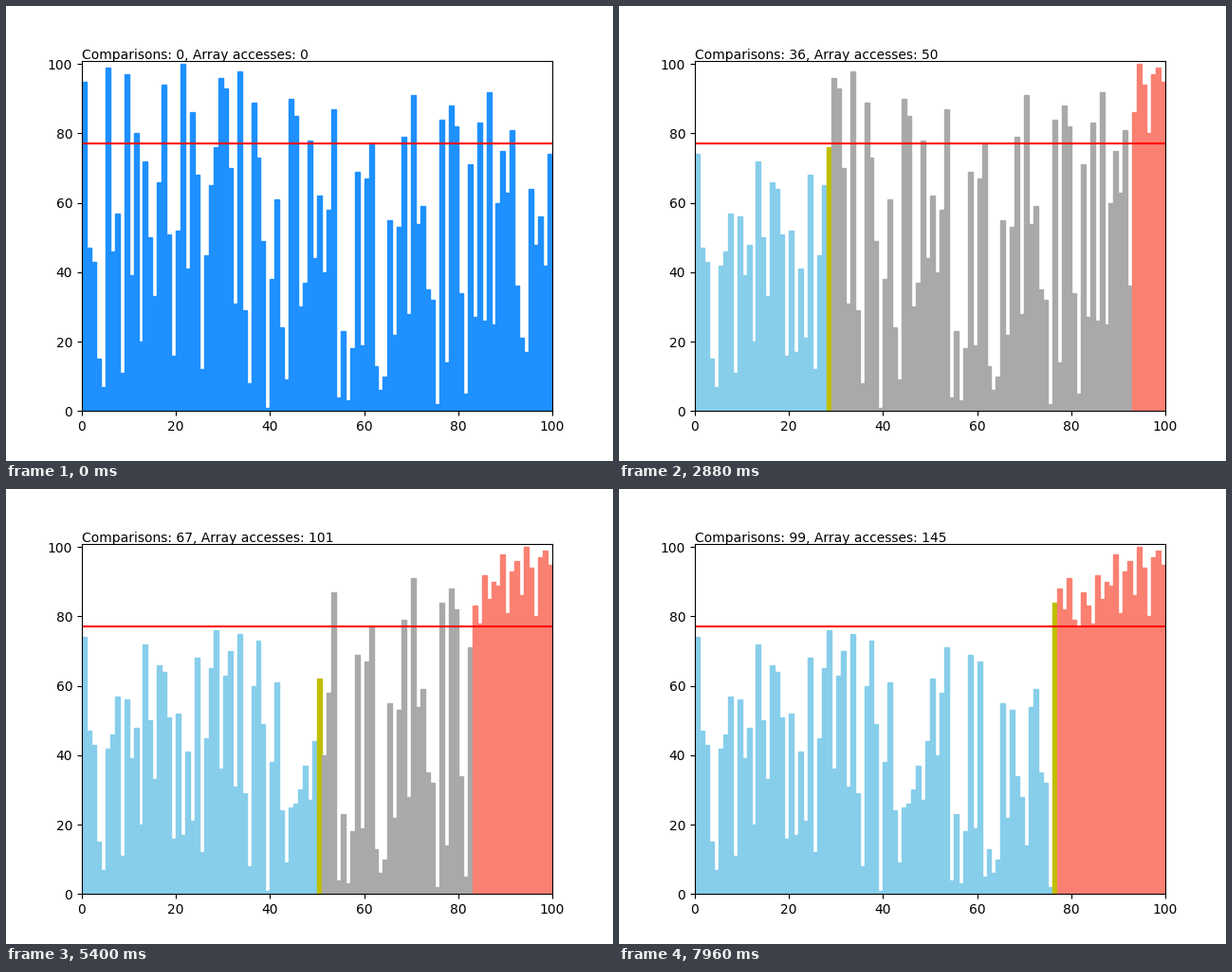
Animation, 640 px wide and 480 px high, one loop 8 s. Source, as a matplotlib script:

```python
import matplotlib.pyplot as plt
from matplotlib.animation import FuncAnimation

VALUES = [
    95, 47, 43, 15, 7, 99, 46, 57, 11, 97, 39, 80, 20, 72, 50, 33, 66, 94, 51, 16,
    52, 100, 41, 86, 68, 12, 45, 65, 76, 96, 93, 70, 31, 98, 29, 8, 89, 73, 49, 1,
    38, 61, 24, 9, 90, 85, 30, 37, 78, 44, 62, 40, 58, 87, 4, 23, 3, 18, 69, 19,
    67, 77, 13, 6, 10, 55, 22, 53, 79, 28, 91, 54, 59, 35, 32, 2, 84, 14, 88, 82,
    34, 5, 71, 27, 83, 26, 92, 25, 60, 75, 63, 81, 36, 21, 17, 64, 48, 56, 42, 74,
]
N = len(VALUES)
PIVOT = 77
FRAMES = 200
INTERVAL = 40


def paint(low, high, active):
    """Colours for the smaller, unvisited and larger parts."""
    colors = ["skyblue"] * low + ["darkgray"] * (high - low + 1)
    colors += ["salmon"] * (N - 1 - high)
    colors[active] = "y"
    return colors


def partition(values):
    """Yield (values, colors, comparisons, accesses) around every comparison."""
    a = list(values)
    low, high = 0, N - 1
    comparisons = accesses = 0
    yield a[:], ["dodgerblue"] * N, 0, 0
    while low <= high:
        yield a[:], paint(low, high, low), comparisons, accesses
        comparisons += 1
        accesses += 1
        if a[low] < PIVOT:
            yield a[:], paint(low, high, low), comparisons, accesses
            low += 1
        else:
            a[low], a[high] = a[high], a[low]
            accesses += 2
            yield a[:], paint(low, high, high), comparisons, accesses
            high -= 1


steps = list(partition(VALUES))[:FRAMES]

fig, ax = plt.subplots(figsize=(6.4, 4.8), dpi=100)
ax.set_xlim(0, N)
ax.set_ylim(0, N + 1)
bars = ax.bar(range(N), VALUES, width=1, align="edge")
ax.axhline(PIVOT, color="red")
label = ax.text(0, N + 1.5, "")


def update(frame):
    values, colors, comparisons, accesses = steps[frame]
    for bar, value, color in zip(bars, values, colors):
        bar.set_height(value)
        bar.set_color(color)
    label.set_text(f"Comparisons: {comparisons}, Array accesses: {accesses}")
    return [*bars, label]


anim = FuncAnimation(fig, update, frames=FRAMES, interval=INTERVAL,
                     init_func=lambda: update(0), repeat=True, repeat_delay=0)
plt.show()
```
